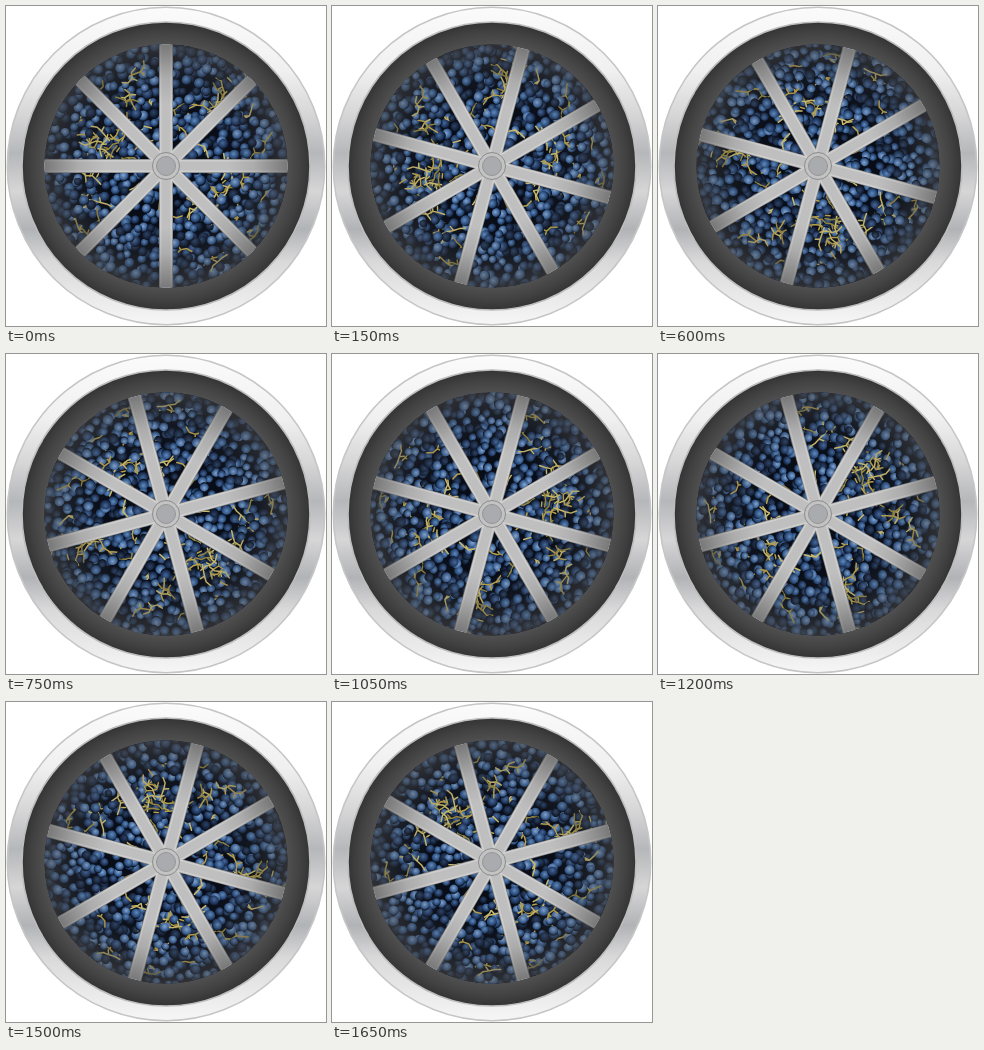
Write an HTML page that moves like this. It is 320 by 320 pixels and loops after 1800 ms.

```html
<!DOCTYPE html>
<html lang="en">
<head>
<meta charset="utf-8">
<title>Grape drum</title>
<style>
html, body { margin: 0; width: 100%; height: 100%; overflow: hidden; background: #fff; }
svg { display: block; width: 100%; height: 100%; }
</style>
</head>
<body>
<svg viewBox="0 0 320 320">
  <defs>
    <linearGradient id="rim" x1="0" y1="0" x2="0" y2="1">
      <stop offset="0" stop-color="#fbfbfb"/>
      <stop offset=".2" stop-color="#f0f0f0"/>
      <stop offset=".34" stop-color="#d6d6d7"/>
      <stop offset=".46" stop-color="#b6b7ba"/>
      <stop offset=".58" stop-color="#d6d6d7"/>
      <stop offset=".7" stop-color="#b2b3b6"/>
      <stop offset=".8" stop-color="#d9d9da"/>
      <stop offset="1" stop-color="#f6f6f6"/>
    </linearGradient>
    <radialGradient id="ring" gradientUnits="userSpaceOnUse" cx="160" cy="160" r="144">
      <stop offset=".84" stop-color="#505050"/>
      <stop offset=".93" stop-color="#424242"/>
      <stop offset="1" stop-color="#343434"/>
    </radialGradient>
    <radialGradient id="shade" gradientUnits="userSpaceOnUse" cx="160" cy="160" r="122">
      <stop offset=".5" stop-color="#484848" stop-opacity="0"/>
      <stop offset=".72" stop-color="#484848" stop-opacity=".16"/>
      <stop offset="1" stop-color="#484848" stop-opacity=".6"/>
    </radialGradient>
    <clipPath id="window"><circle cx="160" cy="160" r="121.5"/></clipPath>
  </defs>
  <circle cx="160" cy="160" r="158.7" fill="url(#rim)" stroke="#c6c6c6" stroke-width="1.6"/>
  <circle cx="160" cy="160" r="144" fill="url(#ring)" stroke="#bdbdbd" stroke-width="1.6"/>
  <g clip-path="url(#window)">
    <rect x="38" y="38" width="244" height="244" fill="#080d18"/>
    <g id="fruit"></g>
    <g id="spokes"></g>
    <circle cx="160" cy="160" r="122" fill="url(#shade)"/>
  </g>
  <circle cx="160" cy="160" r="13.5" fill="#c3c3c3" stroke="#8c8c8c"/>
  <circle cx="160" cy="160" r="9.5" fill="#a9abae" stroke="#959595"/>
</svg>
<script>
const NS = 'http://www.w3.org/2000/svg';
const fruit = document.getElementById('fruit');
const spokes = document.getElementById('spokes');
const defs = document.querySelector('defs');
const LOOP = 1800, STEP = 150;

function add(parent, tag, attrs) {
  const el = document.createElementNS(NS, tag);
  for (const key in attrs) el.setAttribute(key, attrs[key]);
  return parent.appendChild(el);
}

let seed = 71;
function rnd() {
  seed = (seed * 16807) % 2147483647;
  return seed / 2147483647;
}
const spread = size => (rnd() - 0.5) * size;
const pick = list => list[Math.floor(rnd() * list.length)];

// Grape skins, from shadowed to well lit
const skins = [
  ['#2c4468', '#131f36'],
  ['#46699a', '#1c3156'],
  ['#608abf', '#264673'],
  ['#84a6d2', '#355a8d']
];
skins.forEach(([light, dark], i) => {
  const grad = add(defs, 'radialGradient', { id: 'skin' + i, cx: 0.42, cy: 0.38, r: 0.6 });
  add(grad, 'stop', { offset: 0, 'stop-color': light });
  add(grad, 'stop', { offset: 0.7, 'stop-color': dark });
  add(grad, 'stop', { offset: 1, 'stop-color': '#080d18' });
});

function grape(x, y) {
  add(fruit, 'circle', {
    cx: x.toFixed(1), cy: y.toFixed(1), r: (3.8 + rnd() * 1.7).toFixed(1),
    fill: `url(#skin${Math.floor(rnd() * skins.length)})`
  });
}

// Stems gather around these places
const bunches = [[59, 17], [34, 52], [-51, -28], [-61, 37], [50, -62], [12, -55]];

function stem() {
  let x, y, dir = rnd() * 6.283;
  if (rnd() < 0.65) {
    const [cx, cy] = pick(bunches);
    x = cx + spread(42);
    y = cy + spread(42);
  } else {
    const far = 112 * Math.sqrt(rnd());
    x = far * Math.cos(dir);
    y = far * Math.sin(dir);
    dir += 2;
  }
  const point = () => `${x.toFixed(1)} ${y.toFixed(1)}`;
  let d = 'M' + point();
  for (let i = 0; i < 4; i++) {
    dir += spread(1.8);
    x += 6 * Math.cos(dir);
    y += 6 * Math.sin(dir);
    d += 'L' + point();
    if (i === 1) {
      const side = dir + 1.2;
      d += `l${(5 * Math.cos(side)).toFixed(1)} ${(5 * Math.sin(side)).toFixed(1)}M${point()}`;
    }
  }
  add(fruit, 'path', {
    d, fill: 'none', stroke: pick(['#b7a04a', '#93843f', '#c9b86a']),
    'stroke-width': 1.5, 'stroke-linejoin': 'round', 'stroke-linecap': 'round'
  });
}

const spots = [];
for (let y = -124; y <= 124; y += 8) {
  for (let x = -124; x <= 124; x += 8) {
    if (Math.hypot(x, y) < 126) spots.push([x + spread(8), y + spread(8), rnd()]);
  }
}
spots.sort((a, b) => a[2] - b[2]);
spots.forEach(([x, y], i) => {
  grape(x, y);
  if (i > 300 && i % 6 === 0) stem();
});

for (const [width, color] of [[14, '#7d7d7d'], [12.6, '#cecece'], [9, '#bfbfbf']]) {
  for (let a = 0; a < 180; a += 45) {
    add(spokes, 'path', {
      d: 'M0-122V122', transform: `rotate(${a})`, stroke: color, 'stroke-width': width
    });
  }
}

function draw(time) {
  const turn = -30 * Math.floor((time % LOOP) / STEP);
  const pose = `translate(160 160) rotate(${turn})`;
  fruit.setAttribute('transform', pose);
  spokes.setAttribute('transform', pose);
}

let start;
function tick(now) {
  if (start === undefined) start = now;
  draw(now - start);
  requestAnimationFrame(tick);
}
draw(0);
requestAnimationFrame(tick);
</script>
</body>
</html>
```
